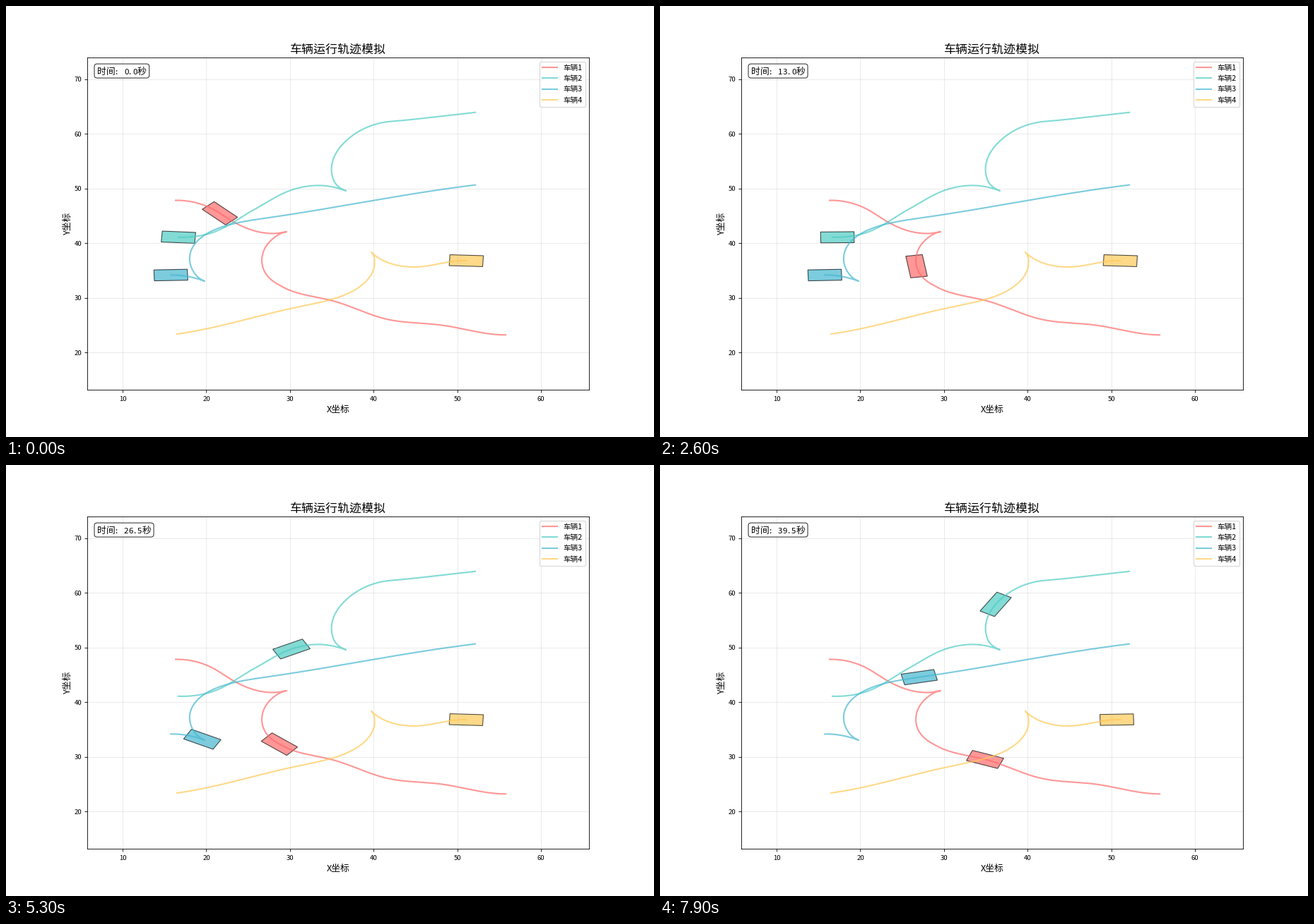
Write a matplotlib script that moves like this. It is 917 by 611 pixels and loops after 8000 ms.

```python
from itertools import pairwise

import numpy as np
import matplotlib.pyplot as plt
from matplotlib.animation import FuncAnimation
from matplotlib.patches import FancyBboxPatch, Polygon
from matplotlib.transforms import Affine2D, ScaledTranslation

W, H, DPI = 917, 611, 76.4
FRAMES, INTERVAL = 80, 100
XLIM, YLIM = (5.74, 65.76), (13.23, 73.93)
CAR = np.array([(-2, -1), (2, -1), (2, 1), (-2, 1)])  # 4 x 2 body
SAMPLES = 80

plt.rcParams["font.family"] = "Noto Sans CJK JP"


def arc_between(start, end):
    """Cubic from one pose to the next, leaving and arriving on heading."""
    p, q = np.array(start[:2]), np.array(end[:2])
    a, b = np.radians([start[2], end[2]])
    reach = np.hypot(*(q - p)) * (1 + (b - a)**2 / 15)
    m0 = reach * np.array([np.cos(a), np.sin(a)])
    m1 = reach * np.array([np.cos(b), np.sin(b)])
    u = np.linspace(0, 1, SAMPLES, endpoint=False)[:, None]
    rise = u * u * (3 - 2 * u)
    return p + (q - p) * rise + m0 * u * (1 - u)**2 - m1 * u * u * (1 - u)


def monotone(t, s, x):
    """Monotone cubic through (t, s), at rest at both ends."""
    x = np.clip(x, t[0], t[-1])
    h = np.diff(t)
    v = np.diff(s) / h
    d = np.zeros(len(t))
    d[1:-1] = 2 * v[:-1] * v[1:] / (v[:-1] + v[1:])
    k = min(np.searchsorted(t, x, "right"), len(h)) - 1
    u = (x - t[k]) / h[k]
    rise = u * u * (3 - 2 * u)
    return (s[k] + (s[k + 1] - s[k]) * rise
            + h[k] * (d[k] * u * (1 - u)**2 - d[k + 1] * u * u * (1 - u)))


class Leg:
    """A stretch in one gear; poses are (x, y, heading[, frame])."""

    def __init__(self, poses):
        parts = [arc_between(a, b) for a, b in pairwise(poses)]
        self.path = np.vstack(parts + [poses[-1][:2]])
        step = np.hypot(*np.diff(self.path, axis=0).T)
        self.arc = np.append(0, np.cumsum(step))
        dx, dy = np.gradient(self.path, axis=0).T
        self.angle = np.unwrap(np.arctan2(dy, dx))
        timed = [i for i, pose in enumerate(poses) if len(pose) == 4]
        self.t = np.array([poses[i][3] for i in timed], float)
        self.s = self.arc[np.array(timed) * SAMPLES]

    def body(self, frame):
        s = monotone(self.t, self.s, frame)
        x, y, a = (np.interp(s, self.arc, c)
                   for c in (*self.path.T, self.angle))
        c, n = np.cos(a), np.sin(a)
        return CAR @ np.array([(c, n), (-n, c)]) + (x, y)


class Car:
    """Drives the first leg, stops, then leaves in the opposite gear."""

    def __init__(self, color, first, second):
        x, y, heading, frame = first[-1]
        turn = (x, y, heading + 180, frame)
        self.color, self.switch = color, frame
        self.legs = Leg(first), Leg([turn, *second])
        self.track = np.vstack([leg.path for leg in self.legs])

    def body(self, frame):
        return self.legs[frame > self.switch].body(frame)


fleet = [
    Car("#FF6B6B",
        [(16.33, 47.84, 2, -12), (21.62, 45.48, -45.7, 0),
         (27.99, 41.78, 0, 9), (29.59, 42.1, 14, 12)],
        [(28.04, 40.94, 230.7, 17), (26.75, 35.61, 280, 27),
         (26.85, 35.18, 284.6, 36), (28.43, 32.6, 318.5, 45),
         (29.3, 31.87, 321, 72), (34.91, 29.54, 339, 79),
         (42.09, 25.94, 344), (48, 25.04, 349), (55.77, 23.23, 360, 106)]),
    Car("#4ECDC4",
        [(16.67, 41.1, -3.7, 20.5), (20.07, 41.64, 21.2, 36),
         (25.64, 46.09, 39.5, 48), (31.07, 50.13, 20, 54),
         (34.32, 50.49, -10.2, 59), (36.69, 49.59, -30, 64)],
        [(35.23, 51.47, 105, 69), (36.18, 57.91, 59.8, 79),
         (42.09, 62.28, 7), (52.14, 63.93, 9, 105)]),
    Car("#45B7D1",
        [(15.76, 34.18, 1.9, 45.5), (19.79, 33.07, -30, 54.5)],
        [(18.56, 34.58, 114, 59), (19.32, 40.96, 51.2, 69),
         (27.04, 44.58, 12.2, 79), (52.14, 50.66, 10.5, 110)]),
    Car("#FECA57",
        [(51.07, 36.81, 177, 73), (44.8, 35.65, 180),
         (39.73, 38.36, 122, 128)],
        [(40.11, 36.43, 270), (35.34, 29.89, 204.6),
         (29.85, 27.98, 199), (16.5, 23.4, 192, 180)]),
]

fig, ax = plt.subplots(figsize=((W + 1e-6) / DPI, (H + 1e-6) / DPI), dpi=DPI)
ax.set_title("车辆运行轨迹模拟", fontsize=16)
ax.set_xlabel("X坐标", fontsize=12)
ax.set_ylabel("Y坐标", fontsize=12, labelpad=2.5)
ax.tick_params(labelsize=9)
ax.tick_params(axis="x", pad=5)
ax.grid(True, alpha=0.3)

bodies = []
for i, car in enumerate(fleet, 1):
    ax.plot(*car.track.T, color=car.color, lw=2, alpha=0.7, label=f"车辆{i}")
    body = Polygon(car.body(0), facecolor=car.color, edgecolor="black",
                   alpha=0.7)
    bodies.append(ax.add_patch(body))
ax.set(xlim=XLIM, ylim=YLIM)
ax.legend(loc="upper right")

# Clock laid out in em units, ASCII in half-width cells
em = (Affine2D().scale(12 / 72) + fig.dpi_scale_trans
      + ScaledTranslation(0.02, 0.95, ax.transAxes))
clock_box = FancyBboxPatch((0, -0.11), 5.5, 0.97, boxstyle="round,pad=0.3",
                           facecolor="white", edgecolor="black", alpha=0.8,
                           transform=em, zorder=2.9)
ax.add_artist(clock_box)
cells = [ax.text(0, 0, "", transform=em) for _ in range(9)]


def set_clock(seconds):
    text = f"时间: {seconds:.1f}秒"
    x = 0
    for cell, ch in zip(cells, text.ljust(len(cells))):
        cell.set(text=ch.strip(), x=x, fontsize=10.8 if ch.isascii() else 12)
        x += 0.5 if ch.isascii() else 1
    clock_box.set_width(x - 0.5 * (len(cells) - len(text)))


def update(frame):
    for body, car in zip(bodies, fleet):
        body.set_xy(car.body(frame))
    set_clock(frame * 0.5)
    return [*bodies, clock_box, *cells]


anim = FuncAnimation(fig, update, frames=FRAMES, interval=INTERVAL,
                     repeat=True, repeat_delay=0)
plt.show()
```
